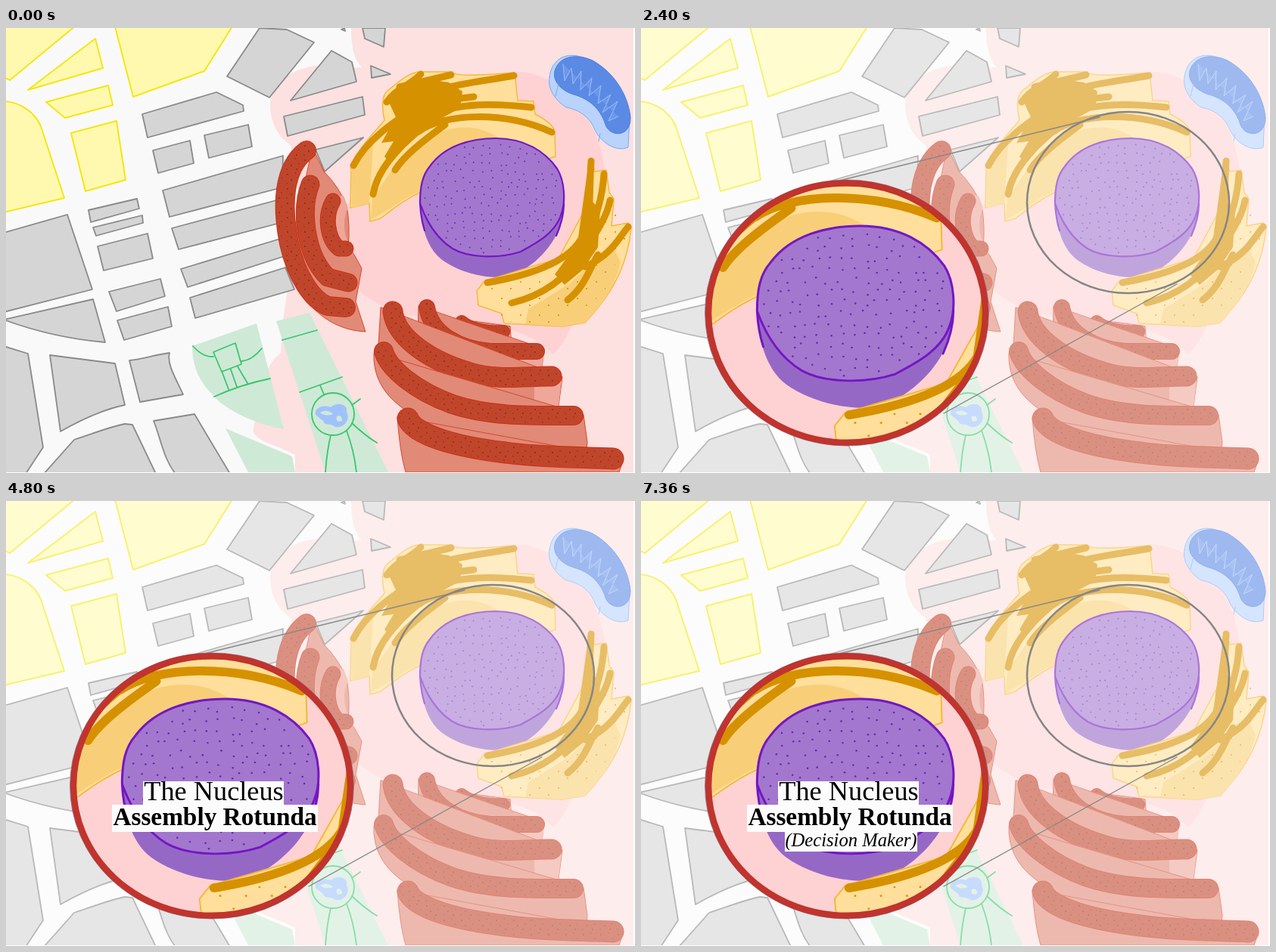
An HTML page that plays this animation: 831 by 589 pixels, repeating every 8000 ms.

```html
<!DOCTYPE html>
<html lang="en">
<meta charset="utf-8">
<title>The cell as a city</title>
<style>
  html, body { margin: 0; width: 100%; height: 100%; overflow: hidden; background: #fff }
  svg { display: block }
  path { stroke-linejoin: round; stroke-linecap: round }
  .yellow { fill: #fff9b0; stroke: #f5e614; stroke-width: 2 }
  .grey { fill: #d5d5d5; stroke: #8a8a8a; stroke-width: 1.8 }
  .lines { fill: none; stroke: #3cc66d; stroke-width: 1.8 }
  .gold { fill: none; stroke: #d69100; stroke-width: 9 }
  .face { fill: #ffdf9b; stroke: #f5b93c; stroke-width: 1.5 }
  .shade { fill: #f8cf78 }
  .pale { fill: #eea79a }
  text { font-family: "Liberation Serif", serif; text-anchor: middle }
  .label rect { fill: #fcfcfc }
</style>
<svg width="831" height="589" viewBox="0 0 831 589">
  <defs>
    <pattern id="specks" width="23" height="19" patternUnits="userSpaceOnUse" fill="#8c2413">
      <circle cx="4" cy="4" r=".9"/><circle cx="14" cy="2" r=".8"/><circle cx="9" cy="11" r=".9"/>
      <circle cx="19" cy="9" r=".8"/><circle cx="3" cy="16" r=".8"/><circle cx="16" cy="16" r=".9"/>
    </pattern>
    <pattern id="grains" width="25" height="22" patternUnits="userSpaceOnUse" fill="#d69100">
      <circle cx="5" cy="6" r="1.1"/><circle cx="17" cy="15" r="1.1"/>
    </pattern>
    <clipPath id="lensClip"><ellipse cx="272" cy="377" rx="181" ry="170"/></clipPath>
    <clipPath id="stage"><path d="M0,0H829V588H0z"/></clipPath>
  </defs>

  <g id="art" clip-path="url(#stage)">
    <path fill="#f9f9f9" d="M0,0H829V588H0z"/>
    <path fill="#fde0e0" d="M456,0C456,25 460,42 470,52C450,54 430,50 410,50C375,54 349,75 349,103C350,130 362,145 376,155L400,300L372,348C367,375 366,390 363,430C345,445 341,460 344,480C340,505 326,515 327,535C335,550 360,552 382,565V588H829V0z"/>
    <path fill="#fed2d3" d="M470,170C540,90 620,58 680,58C710,60 745,80 768,120C800,170 800,250 770,320C760,370 740,420 722,432C700,400 620,385 560,382C520,385 490,365 468,350L445,260z"/>

    <path class="yellow" d="M-3,-3H92L5,69L-3,65zM118,14L128,53L29,82zM144,-2H299L262,57L168,91zM53,98L135,76L141,102L78,119zM86,139L146,123L158,201L105,216zM-3,97C20,98 38,112 46,130L77,225L-3,244z"/>
    <path class="grey" d="M-3,271L81,247L114,346L-3,376zM-3,386L115,359L131,416C85,412 40,402 -3,386zM-3,421L29,431L49,555L26,590H-3zM58,433L144,444L157,499C128,505 100,518 72,534zM163,440C180,438 200,432 216,430C212,445 225,465 234,485L177,495zM50,590L90,545C120,535 140,527 157,524L167,525L198,590zM195,520L249,511L296,590H224C208,570 205,545 195,520z"/>
    <path class="grey" d="M109,241L173,226L176,239L112,257zM115,264L180,248L181,258L119,275zM121,289L187,272L194,305L129,321zM136,349L204,332L210,355L146,375zM147,387L214,369L219,395L156,413zM180,114L278,85L313,102L314,110L187,145zM194,162L243,149L248,179L201,192zM262,142L320,128L325,157L268,172z"/>
    <path class="grey" d="M207,215L366,169L365,211L216,250zM219,265L361,227L366,257L228,293zM231,319L362,279L368,302L240,343zM243,357L369,317L381,346L250,384zM335,0L371,2L407,19L348,92L292,64zM430,30L457,45L463,71L376,96zM367,117L471,91L474,115L372,143zM409,161L472,145L421,190zM471,0H501L499,25L474,14zM482,50L508,61L483,66zM443,2L447,0L448,4z"/>

    <path fill="#cfe9d7" d="M246,421L331,391L367,531C330,525 290,505 275,488C257,470 246,450 246,421zM357,388L401,377L505,588H422zM290,530L378,567L382,588H320z"/>
    <path class="lines" d="M247,421Q260,436 274,435M274,429L303,417L311,445L285,455zM285,454L294,478M297,452L305,475M306,448L319,470M311,441Q325,440 338,424M275,488Q310,472 349,464M365,413L411,400M388,482L444,462M415,473L420,485M422,588Q424,560 429,539M463,588Q460,560 450,533M457,523Q475,540 490,549M457,499L468,491"/>
    <circle class="lines" cx="432" cy="511" r="28"/>
    <path fill="#a0c2fb" d="M409,512C407,502 420,498 429,502C438,494 452,498 450,508C456,520 445,530 435,528C428,522 422,528 419,520z"/>
    <path fill="#cfe9d7" d="M415,509Q424,503 432,511Q422,515 415,509zM437,514Q444,511 444,520Q435,523 437,514z"/>

    <path class="face" d="M455,238L456,182C468,155 490,135 500,122C496,105 497,90 503,84C520,70 535,57 548,58H590Q590,66 672,59L676,96L697,97L699,114C715,122 724,130 725,138L726,170L640,200C560,200 530,225 495,252L481,256L480,232z"/>
    <path class="shade" d="M456,185L485,155L480,232L457,238zM484,225L512,185L506,240L482,254zM512,185C550,135 610,115 653,147L640,190C560,200 530,225 506,240z"/>
    <path class="gold" d="M459,182C475,150 510,125 550,100M485,220C490,190 515,160 550,132M514,188C525,170 550,150 580,128M545,137C580,112 660,110 721,138M560,115C600,98 650,100 694,105M560,86C590,74 640,69 671,63M503,98C515,80 535,75 548,61M520,78L588,62M560,98L618,91"/>
    <path fill="#d69100" d="M503,92L545,66L585,72L603,84L600,106L560,128L525,160L508,180L500,170L512,150L496,152L515,118z"/>

    <path fill="#9668c6" d="M547,230C548,260 555,290 575,306C600,325 640,334 668,328C700,315 736,280 737,235z"/>
    <path id="cap" fill="#a377ce" d="M547,232C547,210 550,195 560,183C580,155 615,146 647,146C685,146 712,163 728,186C738,202 740,230 733,248C725,272 700,285 680,296C650,306 610,304 590,292C568,278 555,255 547,232z"/>
    <g id="pores" fill="#6527b4"></g>
    <path fill="none" stroke="#7416c2" stroke-width="2.2" d="M547,232C547,210 550,195 560,183C580,155 615,146 647,146C685,146 712,163 728,186C738,202 740,230 733,248C725,272 700,285 680,296C650,306 610,304 590,292C568,278 555,255 547,232Q548,252 553,268M737,232Q737,252 727,275"/>

    <path class="face" d="M772,172L778,190L793,188L797,218L803,226L800,262L822,258L826,264C822,305 808,345 765,390L735,395L658,391L655,378L624,367L622,348L632,335L730,305L765,240z"/>
    <path class="shade" d="M690,372L745,338L800,285L812,310C805,340 790,365 765,390L735,395L686,392z"/>
    <path fill="url(#grains)" d="M628,346L730,325L798,228L822,270L790,350L735,393L660,388z"/>
    <path class="gold" d="M773,176C770,220 774,250 762,275C748,305 705,325 636,337M790,193C788,225 780,250 765,285M798,228C794,250 780,270 765,295M822,263C808,280 800,300 765,316M668,364C705,355 740,335 765,292M742,360C765,342 770,320 782,300"/>
    <path fill="#d69100" d="M768,190L775,230L785,240L782,290L762,320L738,340L725,326L755,285z"/>

    <g id="folds"></g>

    <path fill="#b9d3fd" stroke="#7aa7f2" d="M718,65C720,45 735,33 755,37C790,45 818,80 824,115L822,158C805,165 785,150 778,135C770,115 755,108 740,105C725,95 715,80 718,65z"/>
    <path fill="#5b8ae5" stroke="#4a7ddd" d="M728,50C738,34 760,36 775,43C805,60 822,90 825,118C826,145 798,145 792,128C785,105 768,93 750,88C730,82 718,65 728,50z"/>
    <path fill="#6c98ea" stroke="#9dbcf4" d="M736,48L738,70L747,53L749,74L760,57L759,82L774,66L770,90L786,76L782,100L799,88L788,112L808,97L796,123L809,117"/>
    <path fill="none" stroke="#7aa7f2" d="M730,74L726,90M785,140L783,150"/>
  </g>

  <path fill="#fff" opacity=".4" d="M0,0H831V589H0z" data-from="800"/>
  <ellipse id="focus" cx="643.5" cy="231" rx="133.5" ry="120" fill="none" stroke-width="2.5" data-from="1600"/>
  <g data-from="2400">
    <path stroke="#888" stroke-width="1.4" d="M262,202L606,118M400,510L708,339"/>
    <g clip-path="url(#lensClip)">
      <use href="#art" transform="matrix(1.365 0 0 1.31 -593.3 70.7)"/>
    </g>
    <ellipse cx="272" cy="377" rx="187.5" ry="176" fill="none" stroke="#8d8fae"/>
    <ellipse cx="272" cy="377" rx="183" ry="171.8" fill="none" stroke="#c0342d" stroke-width="8.5"/>
  </g>
  <g class="label" data-from="3200" data-to="4800">
    <rect x="181" y="371" width="193" height="34"/>
    <text x="278" y="396" font-size="36" font-weight="700">The Nucleus</text>
  </g>
  <g class="label" data-from="4800">
    <rect x="181" y="371" width="186" height="32"/>
    <rect x="140" y="402" width="272" height="36"/>
    <text x="274.5" y="396" font-size="36.3">The Nucleus</text>
    <text x="276" y="429" font-size="33.3" font-weight="700">Assembly Rotunda</text>
  </g>
  <g class="label" data-from="6400">
    <rect x="190" y="437" width="175" height="27"/>
    <text x="277.5" y="457" font-size="24.6" font-style="italic">(Decision Maker)</text>
  </g>
</svg>
<script>
const LOOP = 8000;
const $ = id => document.getElementById(id);

// Each fold: side face, pale end, ridge line, ridge width; listed back to front
const folds = [
  ["M405,158L420,190Q440,210 450,235Q455,262 452,290L460,300L470,318L462,362L475,402C430,400 390,370 372,310z",
   "M434,222L446,222L452,238Q441,260 454,290L436,280z", "M397,162C366,185 364,235 374,285C384,330 405,360 425,368L449,370", 25],
  ["", "", "M402,207C389,240 395,300 425,330L452,337", 24],
  ["", "", "M432,229C420,250 425,280 440,292L449,292", 20],
  ["M592,385L591,405L625,425L668,420L666,395z", "M636,405L666,402L668,420L645,419z", "M602,389C615,400 640,404 657,402", 17],
  ["M545,368L544,408L620,455L708,450L711,425z", "M678,432H711L708,450L680,452z", "M556,370C562,405 600,425 640,428L701,428", 21],
  ["M495,370L492,420L570,490L690,505L730,500L735,462z", "M698,468L734,466L730,500L698,503z", "M511,375C515,410 560,440 610,455C650,468 690,460 721,461", 26],
  ["M486,430Q484,472 520,500L600,560H767L768,548L763,512z", "", "M499,428C505,450 540,480 590,498C640,515 700,513 750,513", 25],
  ["M517,515Q520,560 528,588H810L816,570z", "", "M531,517C540,540 600,555 660,562C700,568 760,568 802,570", 28]
];
const stroke = (d, colour, width) =>
  `<path d="${d}" fill="none" stroke="${colour}" stroke-width="${width}"/>`;
$("folds").innerHTML = folds.map(([face, pale, ridge, w]) =>
  `<path d="${face}" fill="#e18a77" stroke="#d5492f"/><path class="pale" d="${pale}"/>` +
  stroke(ridge, "#cb3016", w + 1) + stroke(ridge, "#c0462b", w - 1) + stroke(ridge, "url(#specks)", w - 5)
).join("");

// Pores on a jittered grid inside the nucleus
let seed = 7, pores = "";
const random = () => (seed = seed * 16807 % 2147483647) / 2147483647;
for (let y = 154; y < 300; y += 11)
  for (let x = 552; x < 735; x += 12) {
    const px = x + random() * 8, py = y + random() * 7;
    if (((px - 642) / 90) ** 2 + ((py - 224) / 74) ** 2 < 1)
      pores += `<circle cx="${px.toFixed(1)}" cy="${py.toFixed(1)}" r=".95"/>`;
  }
$("pores").innerHTML = pores;

const timed = [...document.querySelectorAll("[data-from]")];
function draw(now) {
  const t = now % LOOP;
  for (const el of timed) {
    const { from, to = LOOP } = el.dataset;
    el.style.display = t >= +from && t < +to ? "" : "none";
  }
  $("focus").setAttribute("stroke", t < 2400 ? "#c0302c" : "#858585");
  requestAnimationFrame(() => draw(performance.now()));
}
draw(performance.now());
</script>
</html>
```
